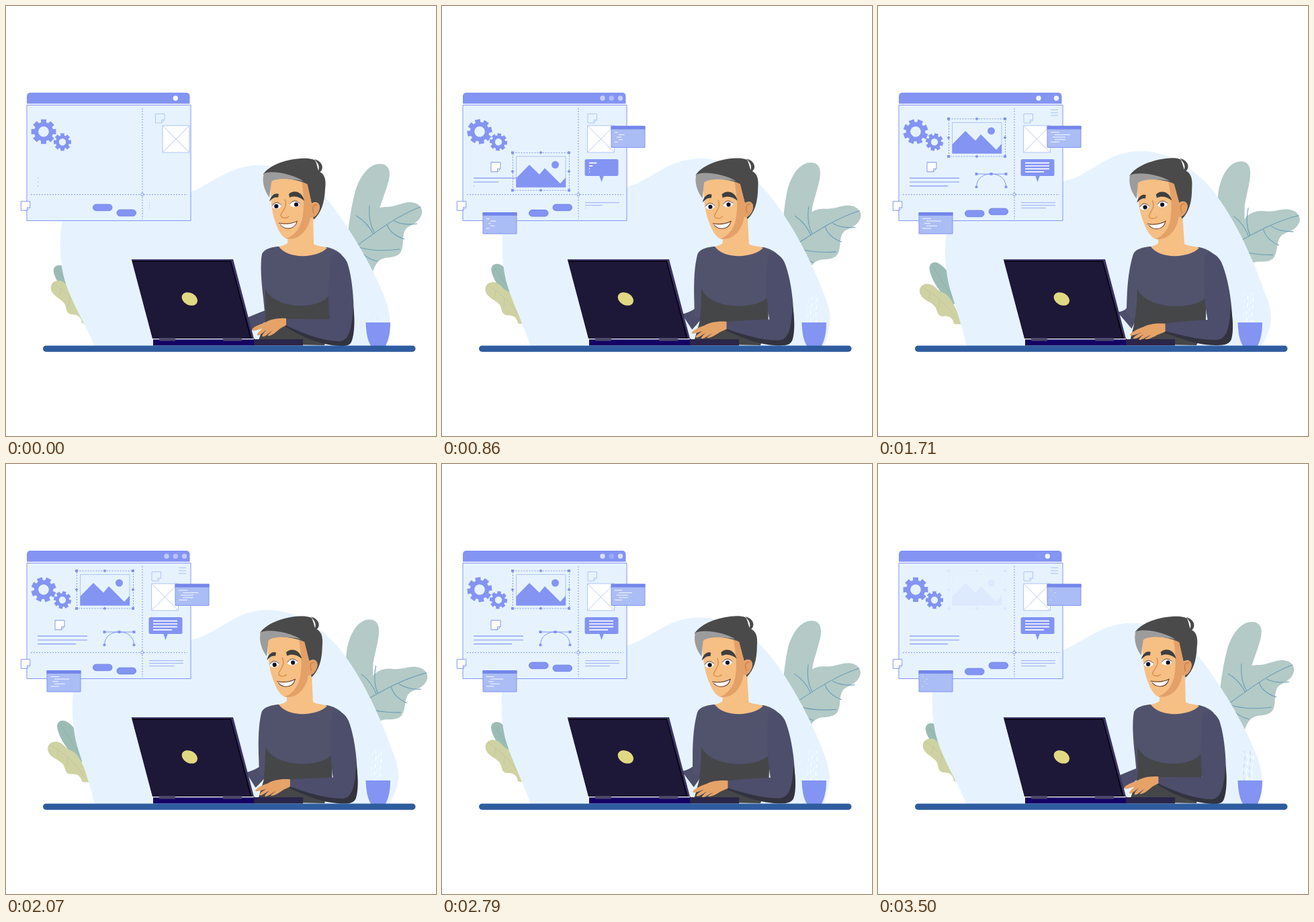
Recreate the animation shown at these times as an HTML page with a canvas. Size 640 by 640 pixels, loop 3.57 s.

```html
<!DOCTYPE html>
<html lang="en">
<head>
<meta charset="utf-8">
<title>Designer at work</title>
<style>
html, body { margin: 0; width: 100%; height: 100%; overflow: hidden; background: #fff; }
canvas { display: block; width: 640px; height: 640px; }
</style>
</head>
<body>
<canvas id="stage" width="640" height="640"></canvas>
<script>
const c = document.getElementById('stage').getContext('2d');
const LOOP = 3570, STEP = 71.4, TAU = Math.PI * 2;
const BLUE = '#8394f3', PALE = '#e6f3ff', SOFT = '#aabdf5', THIN = '#b0c3f5';
const SKIN = '#f6bf83', TAN = '#e3a067', HAIR = '#4a4a4a', SLEEVE = '#4d4e6b', SHIRT = '#51536d';

// Timing helpers
const clamp = v => Math.max(0, Math.min(1, v));
const ramp = (t, a, b) => clamp((t - a) / (b - a));
const ease = (t, a, b) => (1 - Math.cos(Math.PI * ramp(t, a, b))) / 2;
const wave = (t, period) => (1 - Math.cos(TAU * t / period)) / 2;
const mix = (a, b, k) => a + (b - a) * k;

// Blends two paths that share the same commands
const NUM = /-?\d+(\.\d+)?/g;
function blend(a, b, k) {
  const ends = b.match(NUM);
  let i = 0;
  return a.replace(NUM, v => mix(+v, +ends[i++], k).toFixed(2));
}

// Drawing helpers
function fill(d, color) {
  c.fillStyle = color;
  c.fill(new Path2D(d));
}
function stroke(d, color, width = 1) {
  c.strokeStyle = color;
  c.lineWidth = width;
  c.stroke(new Path2D(d));
}
function box(x, y, w, h, color, edge, r = 0) {
  c.beginPath();
  c.roundRect(x, y, w, h, r);
  if (color) { c.fillStyle = color; c.fill(); }
  if (edge) { c.strokeStyle = edge; c.lineWidth = 1; c.stroke(); }
}
function dot(x, y, rx, color, ry = rx, turn = 0) {
  c.beginPath();
  c.ellipse(x, y, rx, ry, turn, 0, TAU);
  c.fillStyle = color;
  c.fill();
}
function row(x, y, w, color, width = 1.2) {
  stroke(`M${x},${y} h${Math.max(1, w)}`, color, width);
}
function layer(alpha, draw) {
  if (alpha <= 0) return;
  c.save();
  c.globalAlpha *= alpha;
  draw();
  c.restore();
}
function pivot(x, y, angle, draw, scale = 1) {
  c.save();
  c.translate(x, y);
  c.rotate(angle);
  c.scale(scale, scale);
  c.translate(-x, -y);
  draw();
  c.restore();
}

function plants(k) {
  pivot(520, 380, -0.128 * k, () =>
    fill('M507,390 C506,350 511,310 520,275 C528,250 542,234 558,235 C571,236 573,248 569,262 C565,276 560,288 556,301 L545,380 Z', '#b3cac6'));
  pivot(520, 380, 0.125 * k, () => {
    fill('M507,372 L540,310 Q551,298 568,299 C583,298 590,292 601,292 C614,292 621,301 619,309 C616,321 606,324 597,330 C588,338 593,352 589,363 C586,373 574,374 564,375 C552,378 549,387 545,398 Z', '#b3cac6');
    stroke('M522,357 C550,337 580,313 617,299 M549,338 Q539,322 541,297 M547,340 Q538,322 521,312 M567,325 Q572,340 593,347 M578,320 Q592,327 612,324 M522,358 Q548,367 586,362 M524,361 Q535,376 553,380', '#6c9db8', 1.1);
  });
  pivot(125, 450, 0.1 * k, () => {
    fill('M112,445 C92,434 75,412 71,397 C69,387 78,383 86,388 C98,394 112,412 128,445 Z', '#9bbcb5');
    stroke('M76,392 Q90,412 110,436', '#8cafa9', 0.8);
  });
  pivot(125, 470, -0.1 * k, () => {
    fill('M126,474 L113,472 C112,463 107,459 98,459 C88,458 91,449 87,443 C82,435 70,433 67,422 C65,411 75,406 84,410 C92,414 93,421 101,424 C112,429 118,450 126,474 Z', '#cfd2a2');
    stroke('M71,413 Q100,432 118,466 M82,421 l-2,10 M95,434 l-2,12', '#c0c495', 0.8);
  });
}

function backdrop(k) {
  fill(blend(
    'M132,506 C116,470 97,440 88,410 C78,375 79,335 86,310 C110,285 160,300 205,297 C240,294 262,283 290,270 C320,253 340,239 372,237 C420,235 455,260 480,290 C512,331 545,387 562,430 C572,455 573,468 569,485 L566,506 Z',
    'M132,506 C125,475 113,440 107,420 C98,385 97,345 108,305 C130,280 170,285 205,280 C240,275 265,263 290,257 C325,243 345,217 388,216 C432,215 465,240 490,265 C527,306 558,375 575,425 C586,450 588,468 581,485 L572,506 Z', k), PALE);
}

function gear(x, y, r, hole, turn) {
  c.save();
  c.translate(x, y);
  c.rotate(turn);
  c.beginPath();
  for (let i = 0; i < 8; i++) {
    const a = i * TAU / 8 - TAU / 4;
    for (const [da, q] of [[-0.27, 0.76], [-0.22, 1], [0.22, 1], [0.27, 0.76]])
      c.lineTo(r * q * Math.cos(a + da), r * q * Math.sin(a + da));
  }
  c.closePath();
  c.moveTo(hole, 0);
  c.arc(0, 0, hole, 0, TAU, true);
  c.fillStyle = BLUE;
  c.fill();
  c.restore();
}

function note(x, y, s, edge, color = '#fff') {
  const f = s * 0.68;
  const d = `M${x},${y} h${s} v${f} l${f - s},${s - f} h${-f} Z`;
  fill(d, color);
  stroke(`${d} M${x + s},${y + f} h${f - s} v${s - f}`, edge, 1);
}

function imageCard(y) {
  c.save();
  c.translate(0, y);
  box(110.5, 164.5, 73.5, 46, null, THIN);
  fill('M110.5,210.5 V197 L130,177 L145,191.5 L153,182 L176,205 L184,196 V210.5 Z', BLUE);
  dot(168.5, 177, 5.5, BLUE);
  c.setLineDash([2, 2]);
  box(105.5, 159, 84, 56, null, BLUE);
  c.setLineDash([]);
  for (const px of [105, 189]) for (const py of [159, 215]) box(px - 2, py - 2, 4, 4, BLUE);
  for (const [px, py] of [[147, 159], [147, 215], [105, 187], [189, 187]])
    fill(`M${px - 2.5},${py} l2.5,-2.5 l2.5,2.5 l-2.5,2.5 Z`, BLUE);
  c.restore();
}

function popup(x, y, rows, grow) {
  box(x, y, 50, 31.5, SOFT, BLUE);
  box(x - 0.5, y - 0.5, 51, 5, '#7486ea');
  rows.forEach(([dx, w], i) => row(x + dx, y + 9 + i * 3.6, w * grow, '#eff6ff', 1.1));
}

function board(t, sway, slow) {
  box(31, 129, 242.5, 16.5, BLUE, null, [5, 5, 0, 0]);
  for (const x of [239, 252.3, 265.5])
    layer(x === 252.3 ? 1 - sway : sway, () => dot(x, 137.2, 3.7, '#f4f9ff'));
  box(31, 147.5, 244, 172, PALE, BLUE);
  c.setLineDash([2, 2]);
  stroke('M203,152 V317 M37,280.7 H270', BLUE, 1);
  c.setLineDash([]);
  dot(202.7, 280.7, 2.4, BLUE);
  dot(202.7, 280.7, 1.4, '#fff');

  gear(56, 187, 18.8, 7.8, -0.37 * slow);
  gear(84, 202.5, 13.3, 5.2, 0.24 * slow);

  // Text rows are typed one after another
  const typed = [ramp(t, 0, 525), ramp(t, 560, 1150), ramp(t, 1215, 1650)];
  typed.forEach((g, i) => {
    row(47, 256.2 + i * 5.8, (i < 2 ? 74 : 57) * g, BLUE, 1.2);
    row(213, 292.7 + i * 4, (i < 2 ? 51 : 37) * g, '#9aabf5', 1);
  });

  const slide = ease(t, 0, 790);
  note(mix(222.5, 217, slide), 160.5, 13.5, THIN, PALE);
  const x = mix(233, 216.5, slide);
  box(x, 178, 40, 40, '#fff', THIN);
  stroke(`M${x},178 l40,40 m0,-40 l-40,40`, THIN, 0.9);

  const menu = t < 2000 ? ease(t, 1050, 1600) : t < 3100 ? mix(1, 0.1, ease(t, 2200, 2750)) : mix(0.1, 1, ease(t, 3100, 3500));
  layer(menu, () => { for (const y of [154.5, 158.8, 163]) row(257, y, 11, THIN, 1.1); });

  const text = t < 2400 ? ease(t, 430, 1450) : 1 - ease(t, 2600, 3400);
  layer(ramp(t, 70, 390), () => {
    popup(252, 179, [[5, 13], [11, 23], [8, 19], [11, 16], [5, 13]], text);
    popup(61, 307.5, [[5, 13], [11, 22], [8, 9], [11, 16], [5, 13]], text);
  });

  layer(ramp(t, 140, 590), () => pivot(237.5, 243, 0, () => {
    fill('M234,252 h7 l-3.5,10 Z', BLUE);
    box(212.5, 228, 50, 25, BLUE, null, 2.5);
    [36, 36, 36, 28].forEach((w, i) =>
      row(219, 233.6 + i * 4.4, w * ease(t, 430 + i * 180, 1560 + i * 40), '#fff', 1.7));
  }, mix(0.55, 1, ease(t, 140, 640))));

  const size = t < 2000 ? ease(t, 140, 570) : 1 - ease(t, 2960, 3480);
  if (size > 0) pivot(80, 239.5, 0, () => note(73, 232.7, 14, BLUE), size);

  layer(Math.min(ramp(t, 140, 540), mix(1, 0.09, ramp(t, 3180, 3490))), () => imageCard(60 * (1 - ease(t, 775, 2030))));

  layer(Math.min(ramp(t, 1300, 1640), 1 - ramp(t, 3140, 3460)), () => {
    stroke('M146,250 H191 M146.5,269 C147,256 157,250 168.5,250 C180,250 190,256 190.5,269', BLUE, 1);
    for (const px of [146.5, 168.5, 190.5]) box(px - 2, 248, 4, 4, BLUE);
    dot(146.5, 269.3, 2.1, BLUE);
    dot(190.5, 269.3, 2.1, BLUE);
  });

  const b1 = ease(t, 400, 950) - ease(t, 1740, 2280) + ease(t, 2850, 3390);
  const b2 = ease(t, 150, 750) - ease(t, 1380, 1880) + ease(t, 2520, 3050);
  box(129.5, 295.2 + 9 * b1, 28.5, 9.5, BLUE, '#7385e6', 4.7);
  box(165, 303.2 - 8 * b2, 28.5, 9.5, BLUE, '#7385e6', 4.7);
  note(22.3, 290.8, 13.5, BLUE);
}

function head(t, k) {
  const shut = t > 2400 && t < 2600 ? 0.55 : 0;
  pivot(430, 400, -0.052 * k, () => {
    c.translate(-1.3 * k, 0);
    // Back of the hair and its curl
    fill('M383,250 C392,238 412,229 438,227 C452,226 461,228 465,234 C467,238 467,243 465,246 C474,249 477,258 475,272 C474,294 469,308 458,318 L440,262 Z', HAIR);
    fill('M459,228 C468,230 473,238 470,244 C468,247 466,249 462,250 C468,243 467,234 459,228 Z', HAIR);
    fill('M460,230 C465,234 467,239 465,245 C463,239 463,235 460,230 Z', '#fff');
    // Face
    fill('M394,262 C393,283 395,306 401,322 C406,337 413,347 421,347 C438,347 448,333 453,315 C460,316 466,308 467,300 C467,292 460,290 455,294 L448,264 C430,254 405,254 394,262 Z', SKIN);
    fill('M440,259 C444,285 445,312 437,328 C432,338 424,344 417,346 C436,350 450,333 453,315 C460,316 466,308 467,300 C467,291 459,291 455,295 L448,262 Z', TAN);
    stroke('M463,296 C457,295 455,301 458,309', '#c77f47', 1.2);
    fill('M383,251 C388,242 400,236 412,233 L445,240 L450,266 C443,262 435,260 425,258 Z', HAIR);
    fill('M384,249 C399,244 428,251 443,261 C422,256 400,256 395,262 L392,285 C385,276 380,261 384,249 Z', '#9c9c9c');
    // Brows
    fill('M392,291 C394,282 401,277 406,280 L405,285 C399,284 396,287 392,291 Z', '#3f3f3f');
    fill('M421,280 C428,273 441,276 444,290 C437,284 430,282 422,285 Z', '#3f3f3f');
    // Eyes
    for (const [x, y, rx, px] of [[403, 297.3, 7, mix(402.3, 404, k)], [430, 294.8, 7.5, mix(432, 429.5, k)]]) {
      const ry = 4.5 * (1 - shut), cy = y + 1.5 * shut;
      c.save();
      c.beginPath();
      c.ellipse(x, cy, rx, ry, -0.12, 0, TAU);
      c.clip();
      c.fillStyle = '#fff';
      c.fillRect(x - 9, y - 6, 18, 12);
      dot(px, y + 0.7, 3.2, '#34406b');
      dot(px, y + 0.7, 2.6, '#0e0d16');
      c.restore();
      stroke(`M${x - rx},${cy} Q${x - 1},${cy - ry * 2} ${x + rx},${cy - 1}`, '#4a3429', shut ? 1.8 : 0.9);
    }
    // Nose and mouth
    stroke('M415,288 C420,299 411,305 409,311 C409,316 417,317 421,313', '#d58d4e', 1.3);
    fill('M407,324 C416,326 426,325 433,320 C431,328 426,331 420,331 C414,331 410,328 407,324 Z', '#fff');
    stroke('M406,323 C416,325 426,324 434,320 M408,325 C411,329 415,331 420,331 C426,331 431,328 433,321', '#65372a', 1);
  });
}

function person(t, k) {
  // Far arm
  fill(blend(
    'M359,464 C368,460 377,456 386,453 L390,466 C382,474 372,479 364,484 Z',
    'M356,455 C362,455 367,453 371,448 L386,458 C384,468 381,474 378,480 L363,477 Z', k), SLEEVE);
  fill(blend(
    'M406,358 C395,359 385,361 381,369 C378,385 380,410 383,435 L386,466 L410,470 Z',
    'M406,358 C395,359 384,361 380,369 C374,388 371,410 370,435 L369,458 L395,474 Z', k), SHIRT);
  // Torso
  fill(blend(
    'M386,412 C386,440 387,455 386,468 L374,503 L474,505 L482,470 L482,412 Z',
    'M386,412 C386,440 384,455 381,474 L374,503 L474,505 L488,470 L490,412 Z', k), '#454648');
  fill(blend(
    'M406,358 C395,359 385,362 381,370 C380,390 382,405 385,418 C396,453 470,454 482,428 L500,371 C494,364 486,361 478,359 Z',
    'M406,358 C395,359 385,362 381,370 C383,390 384,405 386,420 C397,453 477,454 490,431 L501,371 C495,364 487,361 478,359 Z', k), SHIRT);
  // Neck
  fill(blend(
    'M420,338 L419,353 C415,356 410,357 406,358 C419,377 463,376 478,360 C470,357 460,357 458,354 L457,310 Z',
    'M417,338 L417,353 C414,356 410,357 406,358 C419,377 463,376 478,360 C470,357 459,357 456,354 L453,310 Z', k), SKIN);
  head(t, k);
  // Near arm
  fill(blend(
    'M484,371 C490,364 502,369 508,382 C518,412 520,466 515,496 C513,505 506,506 496,505 C464,503 436,489 417,477 L416,466 C440,465 462,467 482,466 C479,440 480,395 484,371 Z',
    'M487,371 C492,364 504,368 511,381 C525,412 531,469 526,495 C524,504 512,505 502,504 C468,503 446,491 428,486 L426,473 C450,470 470,468 491,467 C486,440 483,395 487,371 Z', k), SLEEVE);
  fill(blend(
    'M416,475 C445,489 473,499 496,499 C511,499 515,478 517,448 C520,470 518,492 514,500 C511,506 505,506 496,506 C464,504 436,490 416,477 Z',
    'M427,484 C452,490 478,497 503,497 C520,497 524,478 525,446 C530,470 529,490 526,497 C522,505 512,505 502,505 C468,504 446,492 427,487 Z', k), '#32333f');
}

function hand(k) {
  fill(blend(
    'M417,465 C402,464 392,467 384,472 C377,474 367,478 366,482 C368,485 374,482 382,480 C377,484 373,488 374,490 C377,492 382,486 388,482 C383,487 380,491 382,492 C386,493 391,486 397,483 C391,488 388,491 390,491 C396,491 402,485 408,480 L417,475 Z',
    'M428,473 C413,472 402,474 395,478 C388,480 377,486 375,490 C378,492 385,489 393,486 C386,489 380,493 380,495 C383,497 390,492 396,489 C391,493 388,496 389,497 C393,498 400,492 406,490 C400,494 396,496 398,496 C404,497 413,491 418,489 L428,485 Z', k), '#e6a368');
}

function laptop() {
  box(219, 495, 151, 10.5, '#140064');
  box(369, 496, 73, 9.5, '#2a2549');
  fill('M186.7,377 H338 L369,495 H218 Z', '#3c3364');
  fill('M187.7,379 H335 L366,495 H218.3 Z', '#080514');
  fill('M188.2,380.8 H333.8 L363.5,494.5 H218.5 Z', '#1e1838');
  stroke('M218,495.6 H369', '#fff', 1.2);
  box(228, 494, 24, 4.5, '#4b4868');
  box(323, 494, 28, 4.5, '#4b4868');
  dot(273.3, 436, 12.3, '#e1d982', 9, 0.5);
}

function cup(t) {
  const rise = clamp(0.2 + t / 1300);
  const gray = wave(t, LOOP / 3) < 0.4 ? '#cbd6e0' : '#f4f8fb';
  c.save();
  c.beginPath();
  c.rect(538, 471 - 44 * rise, 30, 44 * rise);
  c.clip();
  c.setLineDash([6, 5]);
  c.globalAlpha = 0.85 * clamp(0.25 + t / 900);
  [545, 549.5, 553.5, 557.5].forEach((x, i) => {
    c.lineDashOffset = -t / LOOP * 44 + i * 4;
    stroke(`M${x},425 q2,12 0,23 t0,23`, i % 2 ? '#fff' : gray, 1.4);
  });
  c.restore();
  fill('M535.5,471 H572 C572,488 569,497 565,506 H543 C538,497 536,487 535.5,471 Z', BLUE);
}

function draw(t) {
  const sway = wave(t, LOOP / 3), slow = wave(t, LOOP);
  c.fillStyle = '#fff';
  c.fillRect(0, 0, 640, 640);
  plants(slow);
  backdrop(slow);
  board(t, sway, slow);
  person(t, sway);
  laptop();
  hand(sway);
  cup(t);
  box(55, 505.5, 554.5, 9.2, '#2e5c9f', null, 4.6);
}

let start;
function tick(now) {
  start ??= now;
  const t = (now - start) % LOOP;
  draw(Math.floor((t + 5) / STEP) % 50 * STEP);
  requestAnimationFrame(tick);
}
draw(0);
requestAnimationFrame(tick);
</script>
</body>
</html>
```
